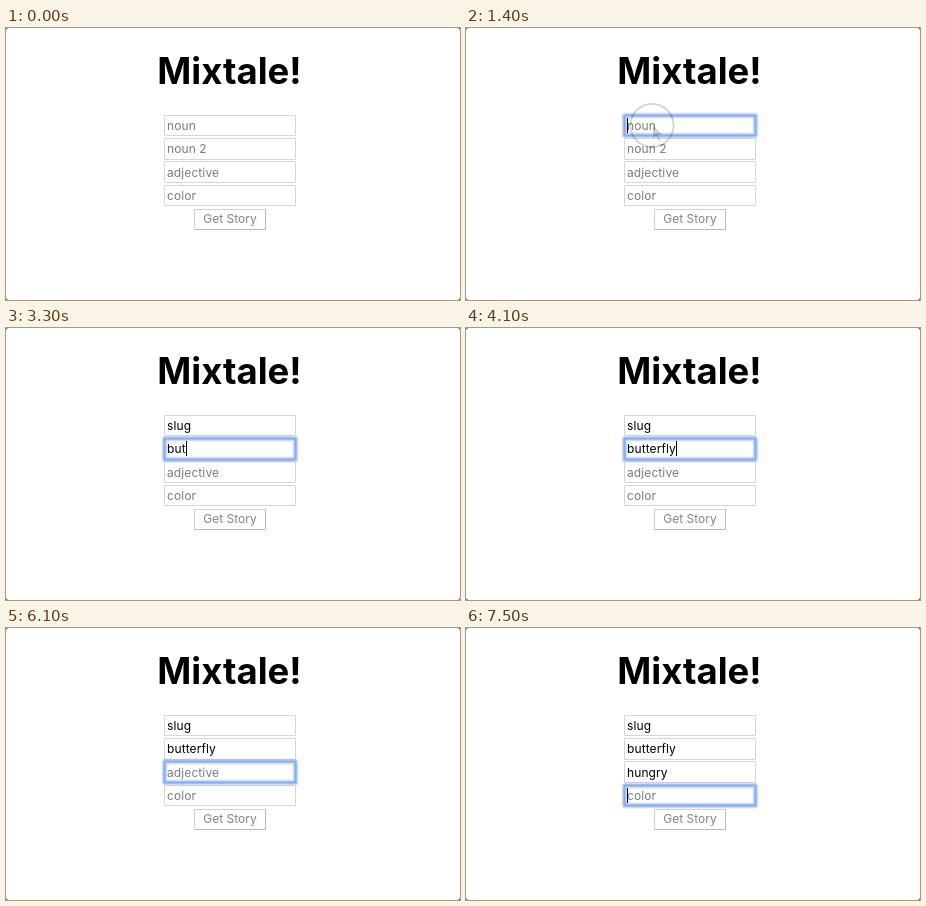
Animation, 454 px wide and 272 px high, one loop 8000 ms. Source, as an HTML page:

```html
<!DOCTYPE html>
<html lang="en">
<head>
<meta charset="utf-8">
<title>Word game form</title>
<style>
  html, body { margin: 0; width: 100%; height: 100%; overflow: hidden; background: #555; }
  svg { display: block; width: 454px; height: 272px; }
  text { font: 12px Inter, "Open Sans", sans-serif; fill: #7c7c7c; }
  .title { font-size: 36.5px; font-weight: 700; fill: #000; }
  .middle { text-anchor: middle; }
  .field { fill: #fff; stroke: #d6d6d6; }
  .glow { fill: none; stroke: #7ba4ee; }
  #labels text { letter-spacing: .1px; }
</style>
</head>
<body>
<svg viewBox="0 0 454 272">
  <rect width="454" height="272" rx="3" fill="#fff"/>
  <text class="title middle" x="223.5" y="55.5">Mixtale!</text>
  <g id="form"></g>
  <rect x="188.5" y="181.5" width="71" height="20" fill="#fff" stroke="#d2d2d2"/>
  <path d="M188 201.5H259.5V181" fill="none" stroke="#bcbcbc"/>
  <text class="middle" x="224" y="195" style="fill:#858585">Get Story</text>
  <g id="focus">
    <rect class="field" stroke-opacity="0"/>
    <rect class="glow" stroke-width="6" opacity=".22"/>
    <rect class="glow" stroke-width="4" opacity=".4"/>
    <rect class="glow" stroke-width="2" opacity=".75"/>
  </g>
  <g id="labels"></g>
  <rect id="caret" width="1" height="15"/>
  <g id="pointer">
    <circle r="21.6" fill="none" stroke="#000" stroke-width="1.8"/>
    <path d="M.5-1.5V14L4 10.8L6.5 16.5L9 15.4L6.6 10H11.3Z" stroke="#fff"/>
  </g>
</svg>
<script>
const LOOP = 8000, STEP = 100, BLINK = 500;
const TOP = 87, PITCH = 23.2, HEIGHT = 20.9;
const fields = [
  { hint: 'noun', word: 'slug', focus: 1000, keys: [1900, 2100, 2200, 2400] },
  { hint: 'noun 2', word: 'butterfly', focus: 2700,
    keys: [3100, 3200, 3300, 3500, 3600, 3700, 3900, 4100, 4100] },
  { hint: 'adjective', word: 'hungry', focus: 4600,
    keys: [6600, 6700, 6900, 7000, 7200, 7300] },
  { hint: 'color', word: '', focus: 7500, keys: [] }
];

const byId = id => document.getElementById(id);
const setAll = (el, attrs) => {
  for (const key in attrs) el.setAttribute(key, attrs[key]);
  return el;
};
const add = (parent, tag, attrs) =>
  parent.appendChild(setAll(document.createElementNS('http://www.w3.org/2000/svg', tag), attrs));
const show = (el, visible) => el.setAttribute('visibility', visible ? 'visible' : 'hidden');
const bezier = (a, b, c, d, u) =>
  a * (1 - u) ** 3 + 3 * b * u * (1 - u) ** 2 + 3 * c * u * u * (1 - u) + d * u ** 3;

// Snap both edges to whole pixels so the borders stay crisp.
function fieldBox(index) {
  const y = TOP + index * PITCH;
  const top = Math.round(y);
  return { x: 158.5, y: top + 0.5, width: 131, height: Math.floor(y + HEIGHT) - top, rx: 0.5 };
}

fields.forEach((field, i) => {
  field.box = fieldBox(i);
  add(byId('form'), 'rect', { class: 'field', ...field.box });
  field.label = add(byId('labels'), 'text', { x: 161, y: Math.round(102.1 + i * 23.3) });
});

function drawFields(time) {
  for (const field of fields) {
    field.typed = field.word.slice(0, field.keys.filter(key => key <= time).length);
    field.label.textContent = field.typed || field.hint;
    field.label.style.fill = field.typed ? '#000' : '';
  }
  const active = fields.filter(field => field.focus <= time).pop();
  show(byId('focus'), active);
  if (!active) return show(byId('caret'), false);

  for (const rect of byId('focus').children) setAll(rect, active.box);
  const lastInput = Math.max(active.focus, ...active.keys.filter(key => key <= time));
  const width = active.typed ? active.label.getComputedTextLength() : 0;
  setAll(byId('caret'), { x: Math.round(161 + width), y: active.box.y + 2.5 });
  show(byId('caret'), Math.floor((time - lastInput) / BLINK) % 2 === 0);
}

function drawPointer(time) {
  const pointer = byId('pointer');
  const u = Math.min(1, Math.max(0, (time - 100) / 700));
  const x = bezier(267, 262, 150, 186, u);
  const y = bezier(174, 24, 24, 97.4, u);
  setAll(pointer, {
    transform: `translate(${x} ${y})`,
    opacity: Math.min(1, (1500 - time) / 600)
  });
  show(pointer, time >= 100 && time < 1500);
}

function draw(now) {
  const time = Math.floor((now % LOOP) / STEP) * STEP;
  drawFields(time);
  drawPointer(time);
}

let start;
function tick(now) {
  start ??= now;
  draw(now - start);
  requestAnimationFrame(tick);
}
draw(0);
requestAnimationFrame(tick);
</script>
</body>
</html>
```
